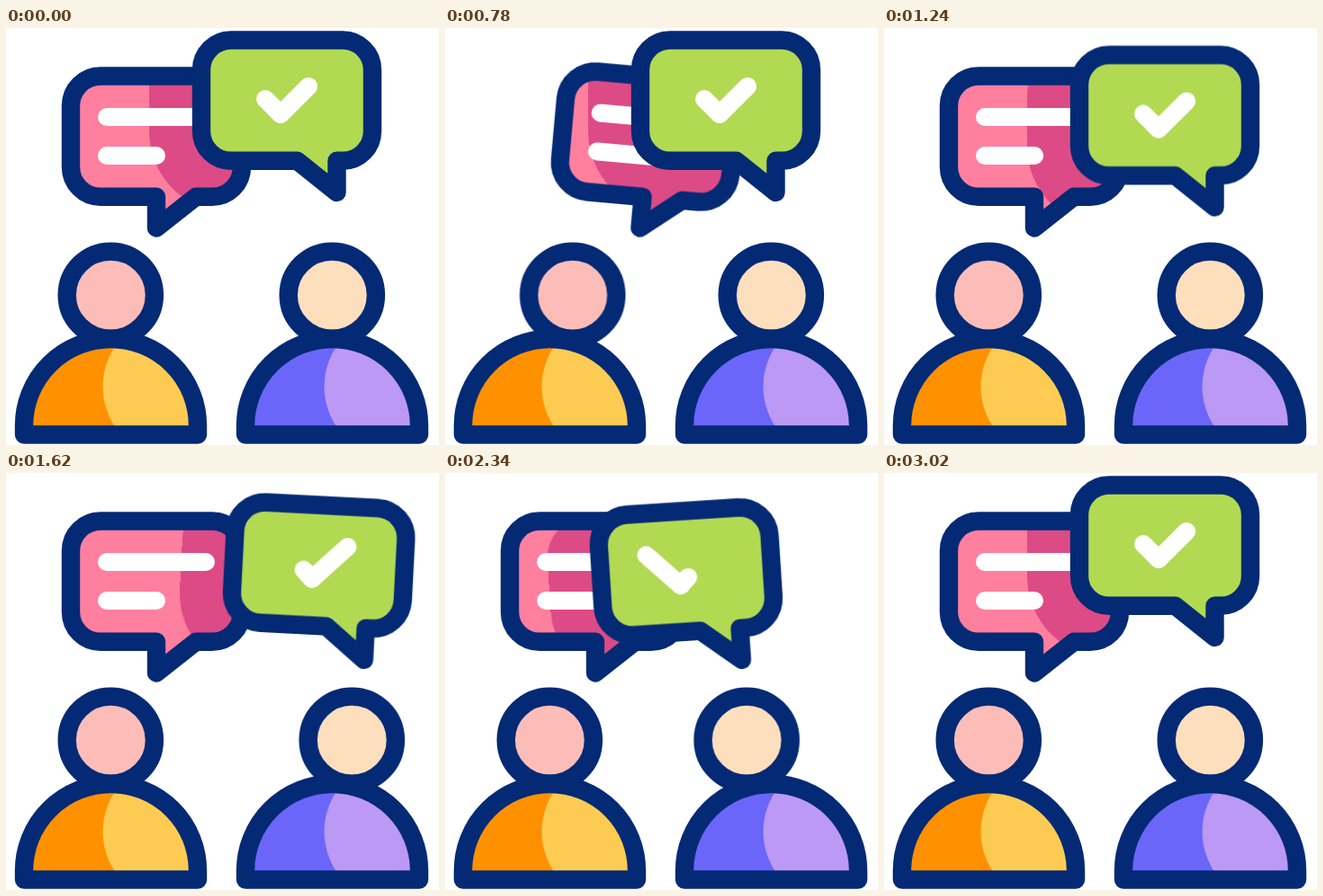
These frames come from a looping animation (481x464 px, 3220 ms). An HTML page:

```html
<!DOCTYPE html>
<html lang="en">
<head>
<meta charset="utf-8">
<title>Two people talking</title>
<style>
  html, body { margin: 0; width: 100%; height: 100%; overflow: hidden; background: #fff; }
  svg { display: block; width: 481px; height: 464px; }

  .ink { fill: none; stroke: #042a75; stroke-width: 20.4; stroke-linejoin: round; }
  .mark { fill: none; stroke: #fff; stroke-width: 20; stroke-linecap: round; }

  .move, .mark {
    animation: 3220ms cubic-bezier(.364, 0, .636, 1) infinite;
  }

  /* Each bubble tilts around the tip of its tail. */
  .pink { --dx: -50px; --turn: -5.2deg; transform-origin: 167px 222.5px; animation-name: sway-first; }
  .green { --dx: 52px; --turn: 5.1deg; transform-origin: 367.5px 183px; animation-name: sway-second; }
  .head1 { --dx: -25.7px; --turn: 0deg; animation-name: sway-first; }
  .head2 { --dx: 37.6px; --turn: 0deg; animation-name: sway-second; }
  .drop { animation-name: drop; }

  .line1 { stroke-dasharray: 110 400; animation-name: line1; animation-delay: 60ms; }
  .line2 { stroke-dasharray: 55 400; animation-name: line2; animation-delay: 60ms; }
  .tick1 { stroke-dasharray: 24 400; animation-name: tick1; animation-delay: 40ms; }
  .tick2 { stroke-dasharray: 44 400; animation-name: tick2; animation-delay: 40ms; }

  @keyframes sway-first {
    0%, 37.267%, 100% { transform: translateX(0px) rotate(0deg); }
    12.422% { transform: translateX(var(--dx)) rotate(var(--turn)); }
    24.845% { transform: translateX(calc(-1 * var(--dx))) rotate(calc(-1 * var(--turn))); }
  }
  @keyframes sway-second {
    0%, 43.478%, 80.745%, 100% { transform: translateX(0px) rotate(0deg); }
    55.901% { transform: translateX(var(--dx)) rotate(var(--turn)); }
    68.323% { transform: translateX(calc(-1 * var(--dx))) rotate(calc(-1 * var(--turn))); }
  }
  @keyframes drop {
    0%, 31.056%, 93.168%, 100% { transform: translateY(0px); }
    43.478%, 80.745% { transform: translateY(25px); }
  }
  @keyframes line1 {
    0%, 24.845%, 100% { stroke-dasharray: 110 400; }
    12.422% { stroke-dasharray: 20 400; }
  }
  @keyframes line2 {
    0%, 37.267%, 100% { stroke-dasharray: 55 400; }
    12.422% { stroke-dasharray: 20 400; }
    24.845% { stroke-dasharray: 90 400; }
  }
  @keyframes tick1 {
    0%, 43.478%, 80.745%, 100% { stroke-dasharray: 24 400; }
    55.901% { stroke-dasharray: .1 400; }
    68.323% { stroke-dasharray: 56 400; }
  }
  @keyframes tick2 {
    0%, 43.478%, 80.745%, 100% { stroke-dasharray: 44 400; }
    55.901% { stroke-dasharray: 66 400; }
    68.323% { stroke-dasharray: 7 400; }
  }
</style>
</head>
<body>
<svg viewBox="0 0 481 464" xmlns="http://www.w3.org/2000/svg">
  <defs>
    <path id="pinkShape" d="M105 53.5H229a33 33 0 0 1 33 33V154.8a33 33 0 0 1-33 33H211L167 222.5V187.8H105a33 33 0 0 1-33-33V86.5a33 33 0 0 1 33-33Z"/>
    <path id="greenShape" d="M250 13.5H374a33 33 0 0 1 33 33V114.8a33 33 0 0 1-33 33H367.5V183L323.5 147.8H250a33 33 0 0 1-33-33V46.5a33 33 0 0 1 33-33Z"/>
    <path id="body" d="M20 452.5V442.5a96.5 96.5 0 0 1 193 0V452.5Z"/>
    <circle id="head" cx="116.3" cy="297.2" r="48.6"/>
    <clipPath id="pinkClip"><use href="#pinkShape" class="move pink"/></clipPath>
    <clipPath id="bodyClip"><use href="#body"/></clipPath>
  </defs>

  <!-- left person -->
  <g class="move head1">
    <use href="#head" fill="#fcbdb8"/>
    <use href="#head" class="ink"/>
  </g>
  <use href="#body" fill="#ff9100"/>
  <circle cx="188" cy="399" r="80.5" fill="#fdcb52" clip-path="url(#bodyClip)"/>
  <use href="#body" class="ink"/>

  <!-- right person -->
  <g transform="translate(246 0)">
    <g class="move head2">
      <use href="#head" fill="#fddfbd"/>
      <use href="#head" class="ink"/>
    </g>
    <use href="#body" fill="#6b66f9"/>
    <circle cx="188" cy="399" r="80.5" fill="#bb99f4" clip-path="url(#bodyClip)"/>
    <use href="#body" class="ink"/>
  </g>

  <!-- pink bubble, shaded by the green one -->
  <use href="#pinkShape" class="move pink" fill="#ff7f9f"/>
  <g clip-path="url(#pinkClip)">
    <g class="move drop">
      <path class="move green" fill="#dd4b86" d="M465 14.6H202a43 43 0 0 0-43 43V115a91 91 0 0 0 91 91H465Z"/>
    </g>
  </g>
  <g class="move pink">
    <use href="#pinkShape" class="ink"/>
    <path class="mark line1" d="M112 99H222"/>
    <path class="mark line2" d="M112 142H202"/>
  </g>

  <!-- green bubble -->
  <g class="move drop">
    <g class="move green">
      <use href="#greenShape" fill="#b2d952"/>
      <use href="#greenShape" class="ink"/>
      <path class="mark tick1" d="M305 96l-50-50"/>
      <path class="mark tick2" d="M305 96l50-50"/>
    </g>
  </g>
</svg>
</body>
</html>
```
